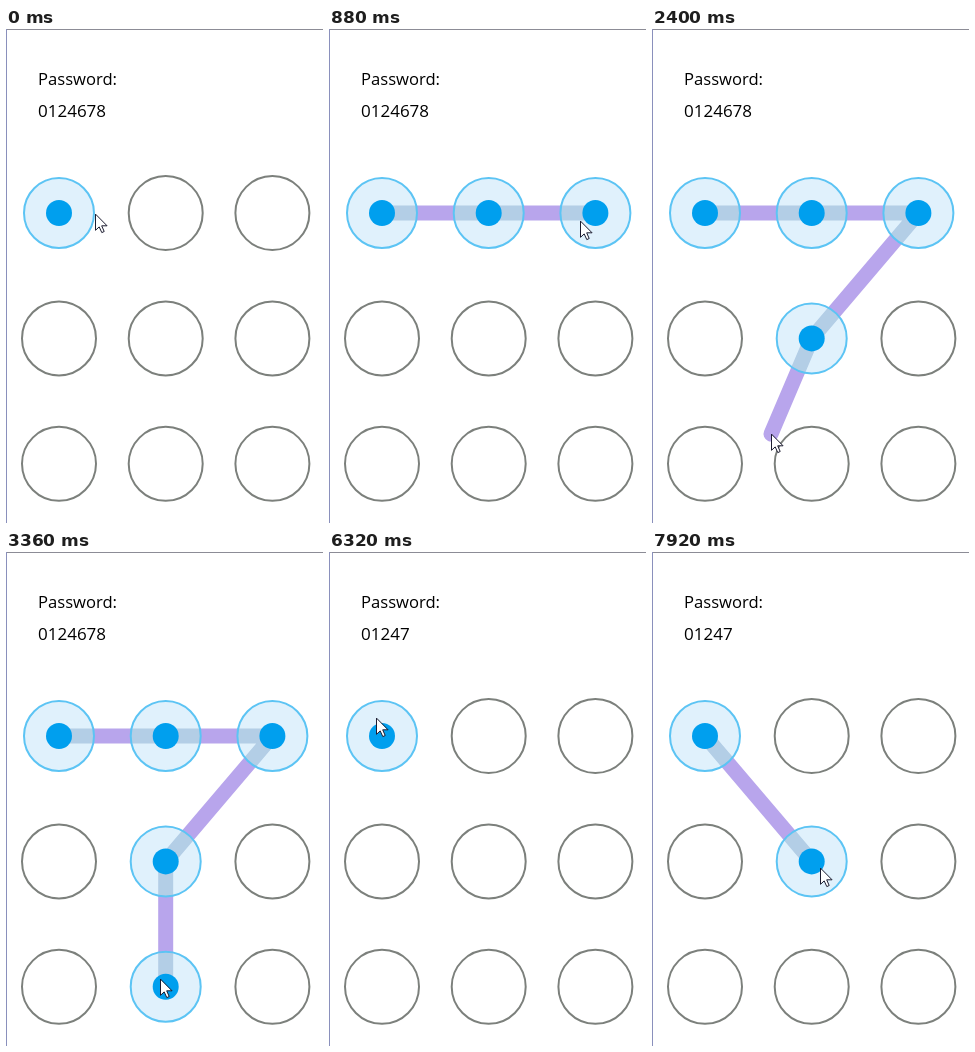
Write an HTML page with a canvas that moves like this. It is 317 px wide and 495 px high and loops after 8000 ms.

```html
<!DOCTYPE html>
<html lang="en">
<head>
<meta charset="utf-8">
<style>
html, body { margin: 0; width: 100%; height: 100%; overflow: hidden; background: #fff; }
canvas { position: absolute; left: 0; top: 0; }
p { position: absolute; left: 32px; margin: 0; line-height: 24px; color: #000;
    font-family: "Open Sans", "Noto Sans", sans-serif; }
#label { top: 39px; font-size: 16.6px; }
#code { top: 71px; font-size: 17px; }
</style>
</head>
<body>
<canvas id="stage" width="317" height="495"></canvas>
<p id="label">Password:</p>
<p id="code"></p>
<script>
const LOOP = 8000, STEP = 80, RELEASE = 4240, PRESS = 6320;
const ctx = document.getElementById('stage').getContext('2d');
const code = document.getElementById('code');
const nodes = Array.from({ length: 9 }, (_, i) => ({
  x: 53 + (i % 3) * 106.7,
  y: 185 + Math.floor(i / 3) * 125.4
}));

// Pointer route: time, x, y
const route = [
  [0, 89, 186], [880, 251, 193], [960, 252, 192], [1120, 252, 192],
  [2000, 157, 317], [2400, 119, 406], [2800, 119, 406], [3360, 154, 428],
  [5280, 154, 428], [6160, 50, 185], [6320, 47, 167], [6480, 47, 167],
  [7360, 150, 295], [7920, 168, 317], [8000, 168, 317]
];
const arrow = new Path2D('M.5 .5V16.3L4.2 12.9L6.8 18.6L9.2 17.5L6.7 11.8H11.7Z');

const ease = p => 0.56 * p + 0.44 * p * p * (3 - 2 * p);

function pointerAt(t) {
  const i = route.findIndex(r => r[0] > t);
  const [t0, x0, y0] = route[i - 1], [t1, x1, y1] = route[i];
  const p = ease((t - t0) / (t1 - t0));
  return { x: x0 + (x1 - x0) * p, y: y0 + (y1 - y0) * p };
}

const nodeUnder = p => nodes.find(n => Math.hypot(n.x - p.x, n.y - p.y) < 37);

// Nodes visited since the current press
function visited(t) {
  const hit = new Set();
  if (t >= RELEASE && t < PRESS) return hit;
  for (let s = t < RELEASE ? 0 : PRESS; s <= t; s += STEP) {
    const n = nodeUnder(pointerAt(s));
    if (n) hit.add(n);
  }
  return hit;
}

function disc(n, r) {
  ctx.beginPath();
  ctx.arc(n.x, n.y, r, 0, 7);
}

function strokeLine(line, color) {
  ctx.strokeStyle = color;
  ctx.lineWidth = 15;
  ctx.stroke(line);
}

function drawActive(n, line) {
  ctx.save();
  disc(n, 35);
  ctx.clip();
  ctx.fillStyle = '#e0f1fc';
  ctx.fill();
  strokeLine(line, '#b3cee6');
  ctx.restore();
  disc(n, 35);
  ctx.lineWidth = 2;
  ctx.strokeStyle = '#5cc4f4';
  ctx.stroke();
  disc(n, 13);
  ctx.fillStyle = '#009fee';
  ctx.fill();
}

function draw(t) {
  const pointer = pointerAt(t), active = visited(t);
  code.textContent = t < RELEASE ? '0124678' : '01247';

  ctx.fillStyle = '#fff';
  ctx.fillRect(0, 0, 317, 495);
  ctx.fillStyle = '#8c8c96';
  ctx.fillRect(0, 1, 317, 1);
  ctx.fillStyle = '#8a90bc';
  ctx.fillRect(0, 1, 1, 494);

  ctx.lineWidth = 2;
  ctx.strokeStyle = '#7c807c';
  for (const n of nodes) {
    if (active.has(n)) continue;
    disc(n, 37);
    ctx.stroke();
  }

  const points = [...active];
  if (points.length && !nodeUnder(pointer)) points.push(pointer);
  const line = new Path2D();
  if (points.length > 1) points.forEach(p => line.lineTo(p.x, p.y));
  ctx.lineCap = ctx.lineJoin = 'round';
  strokeLine(line, '#b8a5ec');
  for (const n of active) drawActive(n, line);

  ctx.save();
  ctx.translate(Math.round(pointer.x), Math.round(pointer.y));
  ctx.lineJoin = 'miter';
  ctx.lineWidth = 1;
  ctx.fillStyle = '#fff';
  ctx.strokeStyle = '#1c1c30';
  ctx.fill(arrow);
  ctx.stroke(arrow);
  ctx.restore();
}

const start = performance.now();
function tick() {
  const t = (performance.now() - start) % LOOP;
  draw(Math.floor(t / STEP) * STEP);
  requestAnimationFrame(tick);
}
tick();
</script>
</body>
</html>
```
